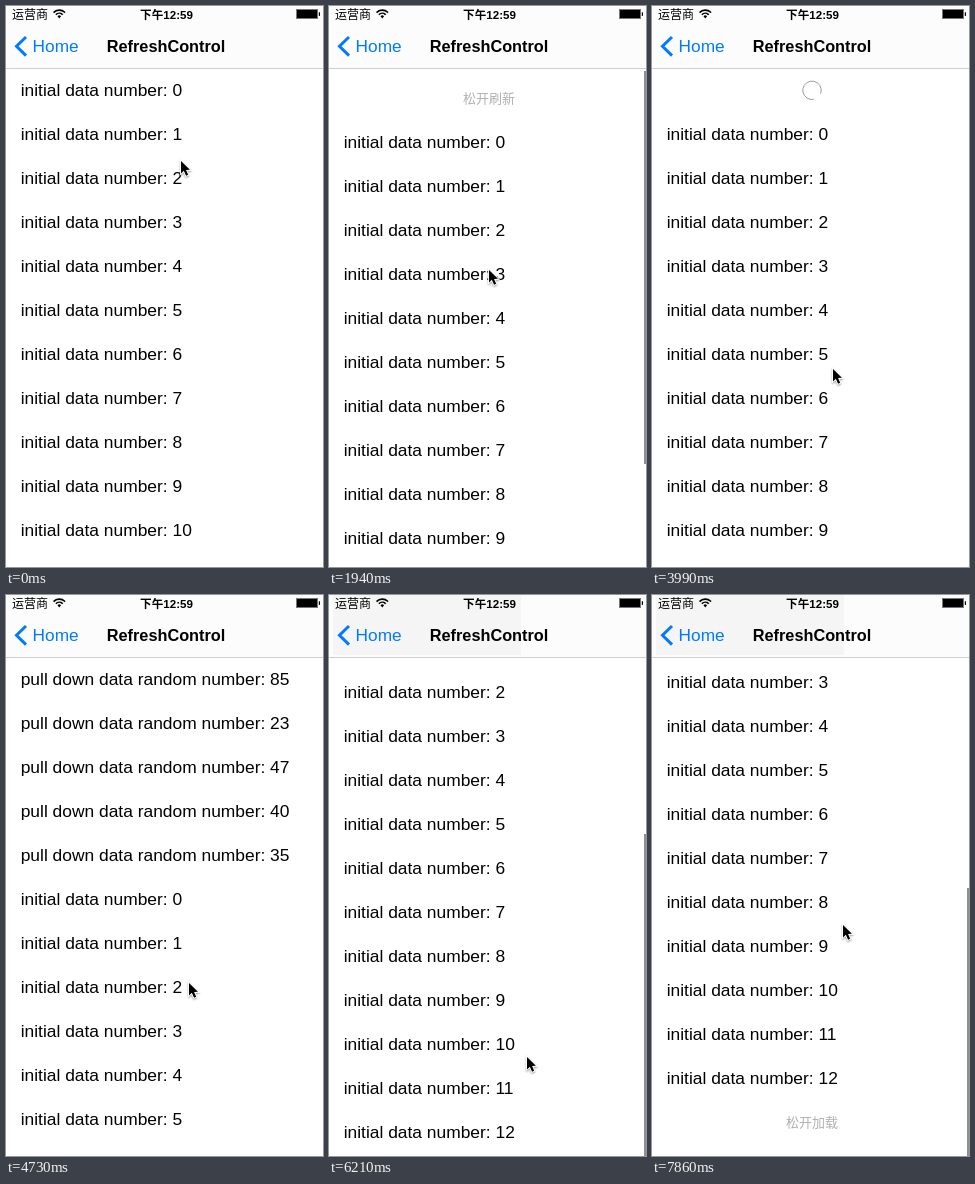
An HTML page with a canvas that plays this animation: 317x561 px, repeating every 8000 ms.

```html
<!DOCTYPE html>
<html lang="zh-CN">
<head>
<meta charset="utf-8">
<style>
  html, body { margin: 0; width: 100%; height: 100%; overflow: hidden; background: #fff; }
  canvas { display: block; }
</style>
</head>
<body>
<canvas id="stage" width="317" height="561"></canvas>
<script>
const ctx = document.getElementById('stage').getContext('2d');
const LOOP = 8000, STEPS = 54, STEP = LOOP / STEPS;
const LIST_TOP = 63, ROW = 44, THRESHOLD = 44, MAX_SCROLL = 288;
const RELEASED = 2500, LOADED = 4130, FLICKED = 5180;
const LATIN = '"Liberation Sans", Arial, sans-serif';
const CJK = '"Noto Sans CJK SC", "Noto Sans CJK", sans-serif';

const initialRows = Array.from({ length: 13 }, (_, i) => `initial data number: ${i}`);
const loadedRows = [85, 23, 47, 40, 35].map(n => `pull down data random number: ${n}`);

// Progress from 0 to 1 between two times, plain or eased.
const ramp = (t, from, to) => Math.max(0, Math.min(1, (t - from) / (to - from)));
const smooth = (t, from, to) => (1 - Math.cos(Math.PI * ramp(t, from, to))) / 2;
const easeOut = (t, from, to) => 1 - (1 - ramp(t, from, to)) ** 3;

function scrollAt(t) {
  const pull = -53 * easeOut(t, 890, 2230);
  const springBack = 9 * easeOut(t, 2380, 2820);
  const hideHeader = THRESHOLD * smooth(t, 4100, 4430);
  const flick = 303 * smooth(t, FLICKED, 6000);
  const settle = -15 * ramp(t, 6070, 6370);
  const drag = 61 * ramp(t, 6380, 7850);
  return Math.round(pull + springBack + hideHeader + flick + settle + drag);
}

function cursorAt(t) {
  const approach = smooth(t, 150, 740), pull = easeOut(t, 890, 2230);
  const leave = smooth(t, 2380, 3110), wander = smooth(t, 3600, 4430);
  const nudge = ramp(t, 4590, 5030), flick = smooth(t, FLICKED, 5620);
  const comeBack = smooth(t, 5700, 6220), drag = ramp(t, 6300, 7850);
  return {
    x: Math.round(175 - 15 * approach + 20 * leave + 3 * wander + 15 * comeBack - 7 * drag),
    y: Math.round(155 + 22 * approach + 88 * pull + 80 * leave + 38 * wander
      + 15 * nudge - 184 * flick + 248 * comeBack - 132 * drag)
  };
}

function text(str, x, y, font, color = '#000', align = 'left') {
  ctx.font = font;
  ctx.fillStyle = color;
  ctx.textAlign = align;
  ctx.fillText(str, x, y);
}

function polyline(points) {
  ctx.beginPath();
  points.forEach(([x, y]) => ctx.lineTo(x, y));
}

function hint(str, centerY) {
  text(str, 160, centerY + 4, `13px ${CJK}`, '#b0b0b0', 'center');
}

function drawSpinner(t, y) {
  const gap = Math.PI / 2 + (t - 3111) / 1000 * Math.PI * 2;
  ctx.beginPath();
  ctx.arc(160, y, 9.2, gap + 0.5, gap + Math.PI * 2 - 0.5);
  ctx.strokeStyle = '#999';
  ctx.lineWidth = 1;
  ctx.stroke();
}

function drawList(t, scroll) {
  const rows = t < LOADED ? initialRows : [...loadedRows, ...initialRows];
  rows.forEach((row, i) => {
    text(row, 14.7, LIST_TOP + i * ROW + 27.3 - scroll, `17.4px ${LATIN}`);
  });

  if (scroll < 0) {
    const y = LIST_TOP - ROW / 2 - scroll;
    if (t < RELEASED) hint(-scroll < THRESHOLD ? '下拉刷新' : '松开刷新', y);
    else if (t < LOADED) drawSpinner(t, y - 0.7);
  }
  if (scroll > MAX_SCROLL) {
    const ready = scroll - MAX_SCROLL >= THRESHOLD;
    hint(ready ? '松开加载' : '上拉加载更多', LIST_TOP + (rows.length + 0.5) * ROW - scroll);
  }
}

function drawIndicator(t, scroll) {
  const over = Math.max(0, -scroll, scroll - MAX_SCROLL);
  const loaded = t >= LOADED;
  const length = (loaded ? 329 : 445 + 65) - over;
  const top = 65 + (loaded && scroll > 0 ? (scroll - over) * 167 / MAX_SCROLL + over : 0);
  const bottom = loaded ? top + length : length;
  ctx.globalAlpha = loaded ? +(t > FLICKED) : +(t > 1000) * (1 - ramp(t, 2500, 2900));
  ctx.fillStyle = '#8e8e8e';
  ctx.fillRect(315, top, 2, bottom - top);
  ctx.globalAlpha = 1;
}

function drawWifi() {
  ctx.strokeStyle = ctx.fillStyle = '#000';
  ctx.lineWidth = 1.6;
  for (const r of [4.7, 7.9]) {
    ctx.beginPath();
    ctx.arc(53.3, 12, r, -Math.PI * 0.76, -Math.PI * 0.24);
    ctx.stroke();
  }
  ctx.beginPath();
  ctx.moveTo(53.3, 12.6);
  ctx.arc(53.3, 12, 2.5, -Math.PI * 0.76, -Math.PI * 0.24);
  ctx.fill();
}

function drawBattery() {
  ctx.strokeStyle = '#777';
  ctx.fillStyle = '#000';
  ctx.lineWidth = 1;
  ctx.strokeRect(290.5, 3.5, 21, 9);
  ctx.fillRect(291, 4, 20, 8);
  ctx.fillRect(312.8, 6.3, 1.2, 3.6);
}

function drawHeader(scroll) {
  ctx.fillStyle = '#fcfcfc';
  ctx.fillRect(0, 0, 317, 62);
  if (scroll > 0) {
    // Rows behind the translucent bar tint it.
    ctx.fillStyle = '#f5f5f5';
    ctx.fillRect(4, 0, 188, 60);
  }
  ctx.fillStyle = '#cfcfcf';
  ctx.fillRect(0, 62, 317, 1);

  text('运营商', 6, 13, `12px ${CJK}`);
  drawWifi();
  text('下午12:59', 160.5, 13, `bold 11.6px "Liberation Sans", ${CJK}`, '#000', 'center');
  drawBattery();

  polyline([[20, 31], [10.5, 40.3], [20, 49.6]]);
  ctx.strokeStyle = '#007aff';
  ctx.lineWidth = 3;
  ctx.stroke();
  text('Home', 26.6, 46, `17.3px ${LATIN}`, '#007aff');
  text('RefreshControl', 160, 46, `bold 16.3px ${LATIN}`, '#000', 'center');
}

function drawCursor({ x, y }) {
  ctx.save();
  ctx.translate(x, y);
  ctx.scale(0.92, 0.92);
  polyline([[0, 0], [0, 13.5], [3.1, 10.6], [5.5, 16], [7.8, 15], [5.5, 9.8], [9.7, 9.6]]);
  ctx.closePath();
  ctx.shadowColor = 'rgba(0,0,0,.4)';
  ctx.shadowBlur = 2;
  ctx.shadowOffsetY = 1;
  ctx.strokeStyle = '#fff';
  ctx.lineWidth = 2;
  ctx.stroke();
  ctx.shadowColor = 'transparent';
  ctx.fillStyle = '#000';
  ctx.fill();
  ctx.restore();
}

function render(now) {
  // The picture advances in discrete steps.
  const t = Math.min(STEPS - 1, Math.floor((now % LOOP + 14) / STEP)) * STEP;
  const scroll = scrollAt(t);
  ctx.fillStyle = '#fff';
  ctx.fillRect(0, 0, 317, 561);
  drawList(t, scroll);
  drawIndicator(t, scroll);
  drawHeader(scroll);
  drawCursor(cursorAt(t));
}

const start = performance.now();
function tick() {
  render(performance.now() - start);
  requestAnimationFrame(tick);
}
tick();
</script>
</body>
</html>
```
